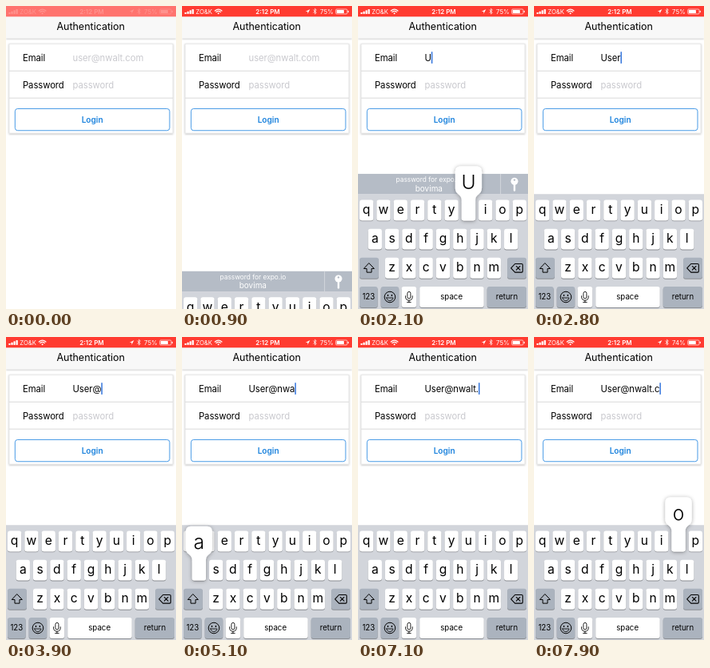
Animation, 213 px wide and 379 px high, one loop 8000 ms. Source, as an HTML page:

```html
<!DOCTYPE html>
<html lang="en">
<head>
<meta charset="utf-8">
<title>Authentication</title>
<style>
html, body { margin: 0; width: 100%; height: 100%; overflow: hidden; background: #fff; }
svg { display: block; width: 100vw; height: 100vh; font-family: Inter, "Liberation Sans", sans-serif; }
</style>
</head>
<body>
<svg id="stage" viewBox="0 0 320 569.4" preserveAspectRatio="none">
  <defs>
    <filter id="soft" x="-30%" y="-30%" width="160%" height="160%">
      <feDropShadow dx="0" dy="1" stdDeviation="1.6" flood-opacity=".32"/>
    </filter>
    <filter id="lift" x="-40%" y="-30%" width="180%" height="160%">
      <feDropShadow dx="0" dy="1" stdDeviation="4" flood-opacity=".35"/>
    </filter>
  </defs>
  <rect y="20" width="320" height="40.5" fill="#f8f8f8" filter="url(#soft)"/>
  <g id="status"></g>
  <text x="159.5" y="45.5" font-size="18.8" text-anchor="middle">Authentication</text>
  <rect x="6" y="71" width="308" height="168" fill="#fff" stroke="#ddd" filter="url(#soft)"/>
  <path d="M6 122H314M6 173H314" stroke="#d9d9d9" stroke-width="1.5"/>
  <g font-size="17" letter-spacing="-.1">
    <text x="31.5" y="103.5">Email</text>
    <text x="31.5" y="154.5">Password</text>
    <text x="125.5" y="154.5" fill="#c9c9ce">password</text>
    <text id="hint" x="125.5" y="103.5" fill="#c9c9ce">user@nwalt.com</text>
    <text id="entry" x="125.5" y="103.5"></text>
  </g>
  <rect id="caret" y="86" width="2.2" height="22" fill="#2f72dc"/>
  <rect x="17" y="193" width="291" height="41" rx="5" fill="#fff" stroke="#2b8be2" stroke-width="1.3"/>
  <text x="162.5" y="219" font-size="15.2" font-weight="600" text-anchor="middle" fill="#1b82dd">Login</text>
  <g id="keyboard"></g>
</svg>
<script>
const LOOP = 8000, STEP = 100, TOP = 353.4, KEY_H = 39;
const $ = id => document.getElementById(id);
const rowY = r => TOP + 10.8 + r * 54.4;

// [character, pressed, inserted, released] in ms
const presses = [
  ['U', 2000, 2100, 2200], ['s', 2200, 2300, 2400], ['e', 2600, 2600, 2700], ['r', 2700, 2700, 2800],
  ['@', 3700, 3800, 3900], ['n', 4500, 4600, 4700], ['w', 4900, 4900, 5000], ['a', 5000, 5100, 5200],
  ['l', 5300, 5300, 5400], ['t', 5500, 5500, 5600], ['.', 6800, 6900, 7000], ['c', 7400, 7400, 7600],
  ['o', 7900, 8000, 8000]
];
const within = (t, a, b) => t >= a && t < b;

const rect = (x, y, w, h, fill, r = 0) =>
  `<rect x="${x}" y="${y}" width="${w}" height="${h}" rx="${r}" fill="${fill}"/>`;
const label = (s, x, y, size, fill = '#000', extra = '') =>
  `<text x="${x}" y="${y}" font-size="${size}" fill="${fill}" text-anchor="middle" ${extra}>${s.replace('&', '&amp;')}</text>`;
const line = (d, width = 1.6, color = '#000', fill = 'none') =>
  `<path d="${d}" fill="${fill}" stroke="${color}" stroke-width="${width}" stroke-linejoin="round" stroke-linecap="round"/>`;
const cap = (x, y, w, dark) =>
  rect(x, y + 1.4, w, KEY_H, '#8a8d92', 4.5) + rect(x, y, w, KEY_H, dark ? '#abb3be' : '#fff', 4.5);

function layout(numeric, upper) {
  const rows = numeric ? ['1234567890', '-/:;()$&@”', '.,?!’'] : ['qwertyuiop', 'asdfghjkl', 'zxcvbnm'];
  const keys = [];
  rows.forEach((row, r) => {
    const wide = numeric && r === 2;
    const start = wide ? 50 : r === 2 ? 51 : r && !numeric ? 19 : 3;
    [...row].forEach((c, i) => keys.push({
      char: upper ? c.toUpperCase() : c,
      x: start + i * (wide ? 45 : 32), y: rowY(r), w: wide ? 39 : 26
    }));
  });
  return keys;
}

function balloon({ char, x, y, w }) {
  const l = x - 12, r = x + w + 12, e = x + w, b = y + KEY_H;
  const d = `M${x + 4} ${b}Q${x} ${b} ${x} ${b - 4}V${y}C${x} ${y - 11} ${l} ${y - 9} ${l} ${y - 22}
    V${y - 53}Q${l} ${y - 63} ${l + 10} ${y - 63}H${r - 10}Q${r} ${y - 63} ${r} ${y - 53}V${y - 22}
    C${r} ${y - 9} ${e} ${y - 11} ${e} ${y}V${b - 4}Q${e} ${b} ${e - 4} ${b}Z`;
  return `<path d="${d}" fill="#fff" filter="url(#lift)"/>` +
    label(char, x + w / 2, y - 20, 37, '#000', 'font-weight="300"');
}

function suggestion() {
  const y = TOP - 38;
  return rect(0, y, 320, 38, '#b5bcc6') + rect(268, y, 1, 38, '#dfe2e7') +
    label('password for expo.io', 133.5, y + 15, 12.5, '#fff') +
    label('bovima', 133.5, y + 32.5, 15, '#fff') +
    `<circle cx="294.5" cy="${y + 14}" r="6.8" fill="#fff"/><circle cx="294.5" cy="${y + 11.5}" r="1.8" fill="#b5bcc6"/>` +
    line(`M294.5 ${y + 20}V${y + 31}`, 3.6, '#fff');
}

function keyboard(t) {
  const numeric = within(t, 3000, 3900) || within(t, 6100, 7100);
  const upper = within(t, 1100, 2100);
  const keys = layout(numeric, upper);
  const y3 = rowY(2), y4 = rowY(3), m3 = y3 + 19.5, m4 = y4 + 19.5;
  let s = rect(0, TOP, 320, 217, '#d2d5db');
  if (t < 2700) s += suggestion();

  for (const k of keys) {
    const small = !numeric && !upper;
    s += cap(k.x, k.y, k.w) + label(k.char, k.x + k.w / 2, k.y + (small ? 26 : 27.5), small ? 23.5 : 22);
  }
  s += cap(3, y3, 36, !upper);
  s += numeric ? label('#+=', 21, m3 + 4.5, 12.5)
    : line(`M21 ${m3 - 9}L30.5 ${m3 + 1}H25.5V${m3 + 8}H16.5V${m3 + 1}H11.5Z`, 1.5, '#000', upper ? '#000' : 'none');
  s += cap(281, y3, 36, true) +
    line(`M288 ${m3}L295.5 ${m3 - 8}H308Q310 ${m3 - 8} 310 ${m3 - 6}V${m3 + 6}Q310 ${m3 + 8} 308 ${m3 + 8}H295.5Z
      M298 ${m3 - 3.5}L305 ${m3 + 3.5}M305 ${m3 - 3.5}L298 ${m3 + 3.5}`);

  s += cap(3, y4, 34, true) + label(numeric ? 'ABC' : '123', 20, m4 + 5, numeric ? 12.4 : 14.5);
  s += cap(43, y4, 34, true) + `<circle cx="60" cy="${m4}" r="10.2" fill="none" stroke="#000" stroke-width="1.5"/>` +
    line(`M56.3 ${m4 - 4}v1.600M63.7 ${m4 - 4}v1.600`, 2) +
    line(`M53.8 ${m4 + 1.5}H66.2Q65 ${m4 + 7} 60 ${m4 + 7}T53.8 ${m4 + 1.5}Z`, 1.2);
  s += cap(82, y4, 28) +
    line(`M93 ${m4 - 7}A3 3 0 0 1 99 ${m4 - 7}V${m4}A3 3 0 0 1 93 ${m4}Z
      M89.5 ${m4 - 2}V${m4}A6.5 6.5 0 0 0 102.5 ${m4}V${m4 - 2}M96 ${m4 + 6.5}V${m4 + 10}M92.5 ${m4 + 10}H99.5`, 1.3);
  s += cap(116, y4, 121) + label('space', 176, m4 + 4.5, 14.6);
  s += cap(243, y4, 74, true) + label('return', 280, m4 + 4.5, 14.5);

  const down = presses.find(p => within(t, p[1], p[3]));
  const key = down && keys.find(k => k.char.toLowerCase() === down[0].toLowerCase());
  return key ? s + balloon({ ...key, char: down[0] }) : s;
}

function status(t) {
  const show = t < 100 ? .22 : t < 200 ? .7 : 1;
  const level = t < 7800 ? 75 : 74;
  let s = rect(0, 0, 320, 20, t < 100 ? '#ff736e' : t < 200 ? '#ff4d43' : '#ff3b30') + `<g opacity="${show}">`;
  for (let i = 0; i < 4; i++) s += rect(5 + i * 4.6, 12 - i * 2, 3.4, 3 + i * 2, '#fff', .6);
  s += label('ZO&K', 41.5, 14.8, 11.6, '#fff');
  s += line('M62 9Q68.5 3.5 75 9M64.5 11.3Q68.5 8 72.5 11.3', 1.8, '#fff') + '<circle cx="68.5" cy="13.8" r="1.5" fill="#fff"/>';
  s += label('2:12 PM', 161.5, 14.8, 12, '#fff', 'font-weight="600"');
  s += '<path d="M241 6L232.5 10.5H236.5V14.5Z" fill="#fff"/>';
  s += line('M247.5 7.5L253 12.5L250.3 15V5L253 7.5L247.5 12.5', 1.1, '#fff');
  s += label(level + '%', 272.5, 14.8, 11.8, '#fff');
  s += '<rect x="289.5" y="6" width="21.5" height="9" rx="1.8" fill="none" stroke="#fff"/>';
  return s + rect(291, 7.5, 18.5 * level / 100, 6, '#fff', .6) + rect(312, 8.7, 1.6, 3.6, '#fff', .8) + '</g>';
}

function caretAlpha(t) {
  if (t < 1000 || within(t, 1700, 2000) || within(t, 3200, 3700) ||
      within(t, 4100, 4500) || within(t, 6000, 6200)) return 0;
  return within(t, 1400, 1700) ? 1 - (t - 1300) / 400 : 1;
}

function draw(t) {
  const typed = presses.filter(p => t >= p[2]).map(p => p[0]).join('');
  $('status').innerHTML = status(t);
  $('entry').textContent = typed;
  $('hint').setAttribute('opacity', typed ? 0 : 1);
  $('caret').setAttribute('x', 125.5 + (typed ? $('entry').getComputedTextLength() : 0));
  $('caret').setAttribute('opacity', caretAlpha(t));
  const drop = t < 900 ? 300 : t < 1300 ? 183 * Math.exp((900 - t) / 110) : 0;
  $('keyboard').setAttribute('transform', `translate(0 ${drop})`);
  $('keyboard').innerHTML = keyboard(t);
}

let last = -1;
function tick() {
  const t = Math.floor(performance.now() % LOOP / STEP) * STEP;
  if (t !== last) draw(last = t);
  requestAnimationFrame(tick);
}
tick();
</script>
</body>
</html>
```
